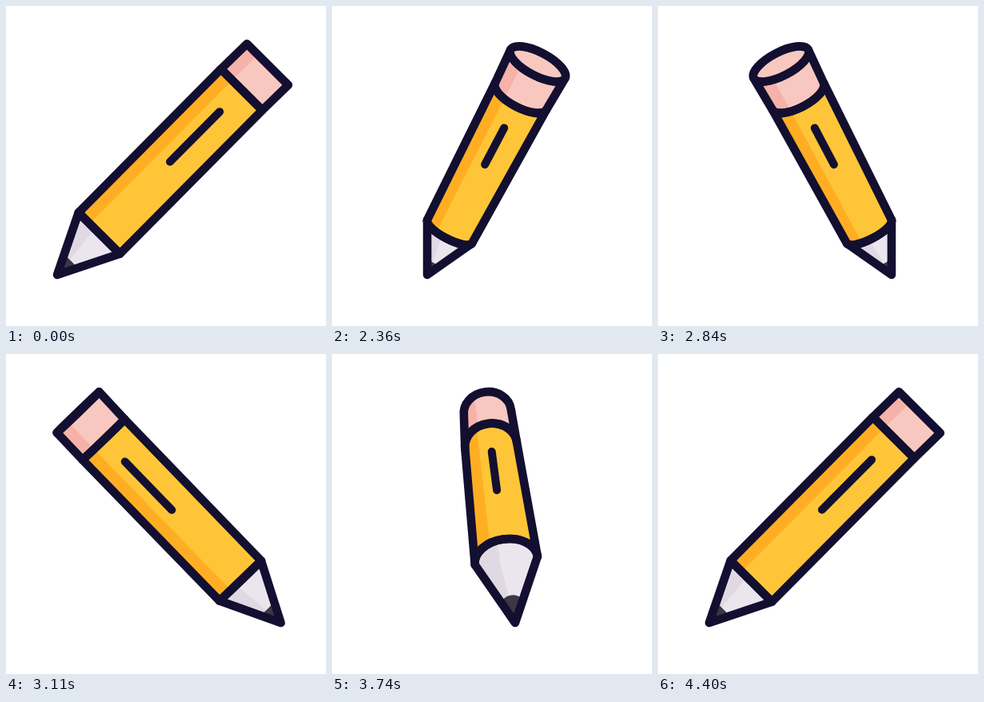
These frames come from a looping animation (400x400 px, 4.43 s). An HTML page with a canvas:

```html
<!DOCTYPE html>
<html lang="en">
<head>
<meta charset="utf-8">
<title>Turning pencil</title>
<style>
  html, body { margin: 0; width: 100%; height: 100%; overflow: hidden; background: #fff; }
  canvas { display: block; width: 100vw; height: 100vh; }
</style>
</head>
<body>
<canvas width="400" height="400"></canvas>
<script>
const ctx = document.querySelector('canvas').getContext('2d');
const LOOP = 4430, HOLD = 2000, STEP = 30, TURN_STEPS = 80;
const AXIS_X = 205.5, RADIUS = 36.5;
const INK = '#130f30';

// Pairs hold the value for the eraser facing the viewer and for the tip facing the viewer.
const RINGS = {
  eraser: { x: 121.5, y: 73, r: RADIUS, warp: [.105, .105], lift: [-.7, 0], grow: [3, -7], round: [.72, .9] },
  seam: { x: 89, y: 104.5, r: RADIUS, warp: [.16, .13], lift: [10.5, 10], grow: [-.5, -4], round: [.73, .88] },
  base: { x: -89, y: 284, r: RADIUS, warp: [-.045, .03], lift: [-2.5, -26], grow: [-7.5, 3], round: [.56, .71] },
  tip: { x: -141.5, y: 336, r: 0, warp: [-.015, -.015], lift: [0, 0], grow: [0, 0], round: [0, 0] }
};

const mix = (a, b, k) => a + (b - a) * k;

function project(ring, phi) {
  const s = Math.sin(phi), side = s < 0 ? 1 : 0;
  const warp = ring.warp[side];
  const r = ring.r + ring.grow[side] * s * s;
  return {
    x: AXIS_X + ring.x * ((1 - warp) * Math.cos(phi) + warp * Math.cos(3 * phi)),
    y: ring.y + ring.lift[side] * Math.abs(s),
    r,
    bulge: ring.round[side] * r * s ** 3
  };
}

function blend(a, b, k) {
  const out = {};
  for (const key in a) out[key] = mix(a[key], b[key], k);
  return out;
}

function draw(phi) {
  const [eraser, seam, base, tip] = Object.values(RINGS).map(ring => project(ring, phi));
  const axis = Math.atan2(eraser.y - tip.y, eraser.x - tip.x);
  const tilt = axis + Math.PI / 2;
  const cos = Math.cos(tilt), sin = Math.sin(tilt);

  // u runs across the pencil in radii, v along it towards the tip in pixels
  const at = (ring, u, v = 0) =>
    [ring.x + cos * u * ring.r - sin * v, ring.y + sin * u * ring.r + cos * v];

  const arc = (path, ring, back) => path.ellipse(ring.x, ring.y, ring.r, Math.abs(ring.bulge), tilt,
    back ? 0 : Math.PI, back ? Math.PI : (ring.bulge > 0 ? 0 : 2 * Math.PI), (ring.bulge > 0) !== back);

  function section(top, bottom) {
    const path = new Path2D();
    arc(path, top, false);
    if (bottom === tip) path.lineTo(tip.x, tip.y);
    else arc(path, bottom, true);
    path.closePath();
    return path;
  }

  function polygon(points) {
    const path = new Path2D();
    points.forEach(p => path.lineTo(...p));
    path.closePath();
    return path;
  }

  function paint(path, color, shadeColor, shade) {
    ctx.fillStyle = color;
    ctx.fill(path);
    ctx.save();
    ctx.clip(path);
    ctx.fillStyle = shadeColor;
    ctx.fill(shade);
    ctx.restore();
  }

  const strip = (top, bottom) => polygon([
    at(top, -2, -50), at(top, -.46, -50), at(top, -.46), at(bottom, -.46),
    at(bottom, -.46, 50), at(bottom, -2, 50)
  ]);

  ctx.fillStyle = '#fff';
  ctx.fillRect(0, 0, 400, 400);
  ctx.strokeStyle = INK;
  ctx.lineWidth = 10.6;
  ctx.lineJoin = ctx.lineCap = 'round';

  const cone = section(base, tip);
  const body = section(seam, base);
  const rubber = section(eraser, seam);

  paint(cone, '#ebe6ee', '#e0d9e3',
    polygon([[tip.x, tip.y], at(base, -.2), at(base, -.2, -50), at(base, -2, -50), at(base, -2)]));
  ctx.fillStyle = '#3c3646';
  ctx.fill(section(blend(tip, base, .33), tip));
  paint(body, '#ffc538', '#ffae24', strip(seam, base));
  paint(rubber, '#f8c8c0', '#f6b2a8', strip(eraser, seam));
  [cone, body, rubber].forEach(path => ctx.stroke(path));

  if (eraser.bulge > 0) {
    ctx.beginPath();
    ctx.ellipse(eraser.x, eraser.y, eraser.r, eraser.bulge, tilt, 0, 2 * Math.PI);
    ctx.fillStyle = '#f8c8c0';
    ctx.fill();
    ctx.stroke();
  }

  const s = Math.sin(phi), slide = s * Math.abs(s);
  const onFront = k => {
    const ring = blend(base, seam, k);
    return at(ring, 0, ring.bulge);
  };
  ctx.lineWidth = 10;
  ctx.beginPath();
  ctx.moveTo(...onFront(.846 + slide * (s > 0 ? -.015 : .09)));
  ctx.lineTo(...onFront(.497 + slide * (s > 0 ? .094 : .075)));
  ctx.stroke();
}

const start = performance.now();
function tick() {
  const time = (performance.now() - start) % LOOP;
  const step = Math.max(0, Math.floor((time - HOLD) / STEP));
  draw(step % TURN_STEPS / TURN_STEPS * 2 * Math.PI);
  requestAnimationFrame(tick);
}
tick();
</script>
</body>
</html>
```
